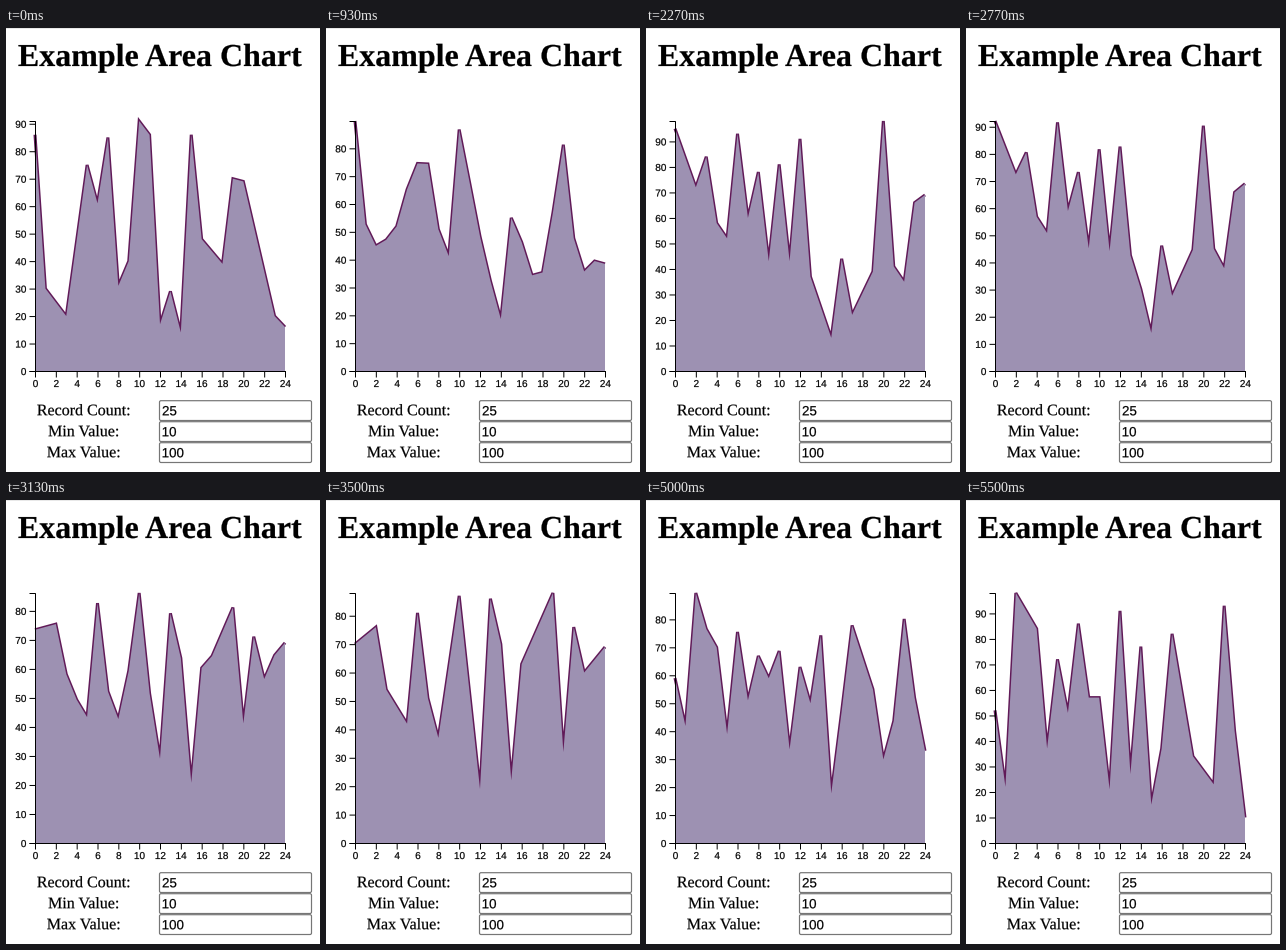
Write a matplotlib script that moves like this. It is 314x444 px and loops after 5570 ms.

```python
import numpy as np
import matplotlib.pyplot as plt
from matplotlib.animation import FuncAnimation
from matplotlib.patches import FancyBboxPatch, PathPatch, Polygon
from matplotlib.textpath import TextPath
from matplotlib.transforms import Affine2D

plt.rcParams.update({"path.simplify": False, "path.snap": False})

WIDTH, HEIGHT, DPI = 314, 444, 100
PX = 72 / DPI                       # points per pixel
LOOP_MS, STEP_MS, TICK_MS = 5570, 10, 100 / 3
FIRST_START, PERIOD, DURATION = 460, 2000, 1000

LEFT, BASE, SIZE = 29, 343, 250     # chart origin and side length
TICK = 6
FILL, STROKE = "#9d91b2", "#611a58"
SERIF, SANS = "Liberation Serif", "Liberation Sans"

_ = np.nan                          # on the straight run between its neighbours
KEY_POINTS = [
    [86, 30, _, 20, _, 75, 61, 85, 31, 40, 91, 86, 17, 29, 14, 86, 48, _, 39, 70, 69, _, _, 20, 16],
    [95, _, 72, 84, 58, 52, 93, 60, 78, 43, 81, 43, 91, 37, _, 13, 44, 22, _, 39, 98, 41, 35, 66, 69],
    [70, _, 76, 54, _, 42, 81, 51, 37, _, 87, _, 19, 86, 70, 22, 63, _, _, 88, 32, 76, 60, _, 69],
    [52, 22, 98, _, 84, 37, 72, 51, 86, 57, 57, 21, 91, 27, 77, 15, 37, 82, _, 34, _, 23, 93, 44, 10],
]


def fill_runs(points):
    points = np.array(points)
    index = np.arange(len(points))
    known = ~np.isnan(points)
    return np.interp(index, index[known], points[known])


SERIES = [fill_runs(points) for points in KEY_POINTS]
XS = LEFT + np.linspace(0, SIZE, len(SERIES[0]))


def ease_cubic(t):
    t = min(max(t, 0), 1)
    return 4 * t ** 3 if t < 0.5 else 1 - 4 * (1 - t) ** 3


def values_at(ms):
    values = SERIES[0]
    for i, target in enumerate(SERIES[1:]):
        progress = (ms - FIRST_START - i * PERIOD) / DURATION
        values = values + (target - values) * ease_cubic(progress)
    return values


fig = plt.figure(figsize=(WIDTH / DPI, HEIGHT / DPI), dpi=DPI, facecolor="white")
ax = fig.add_axes([0, 0, 1, 1])
ax.set(xlim=(0, WIDTH), ylim=(HEIGHT, 0))
ax.axis("off")


def label(x, y, text, size, family, align=0.5, weight="normal"):
    """Draw text on baseline y; align is the fraction of its width left of x."""
    path = TextPath((0, 0), text, size=size, prop={"family": family, "weight": weight})
    box = path.get_extents()
    place = Affine2D().scale(1, -1).translate(x - box.x0 - align * box.width, y)
    return ax.add_patch(PathPatch(path.transformed(place), fc="black", ec="black",
                                  lw=0.2 * PX, zorder=3))


def stroke(xs, ys, color="black", width=1, zorder=3):
    return ax.plot(xs, ys, color=color, lw=width * PX, zorder=zorder,
                   solid_capstyle="butt", solid_joinstyle="miter")[0]


def form_row(y, name, value):
    label(77.3, y + 15.2, name, 16, SERIF)
    ax.add_patch(FancyBboxPatch((153.5, y + 0.7), 152, 19.8, fc="white", ec="#767676",
                                lw=1.2 * PX, boxstyle="round,pad=0,rounding_size=1.5"))
    label(156.7, y + 15.3, value, 13.33, SANS, align=0)


stroke([0, WIDTH], [0.5, 0.5], "#e8e8e8")
label(154, 38, "Example Area Chart", 32, SERIF, weight="bold")
for row, (name, value) in enumerate([("Record Count:", "25"), ("Min Value:", "10"),
                                     ("Max Value:", "100")]):
    form_row(372 + 21 * row, name, value)

# The opaque area hides the inner half of the outline
line = stroke(XS, XS, STROKE, 3, zorder=1.5)
area = ax.add_patch(Polygon(np.zeros((3, 2)), fc=FILL, lw=0, zorder=2))

# Axes sit on pixel centres
axis_x, axis_y, top = LEFT + 0.5, BASE + 0.5, BASE + 0.5 - SIZE
stroke([axis_x, axis_x + SIZE + 0.5], [axis_y, axis_y])
stroke([axis_x - TICK, axis_x, axis_x, axis_x - TICK], [top, top, axis_y, axis_y])
for i in range(0, len(XS), 2):
    x = XS[i] + 0.5
    stroke([x, x], [axis_y, axis_y + TICK])
    label(x, 359, str(i), 10, SANS)

levels = range(0, 100, 10)
y_ticks = [stroke([axis_x - TICK, axis_x], [axis_y, axis_y]) for level in levels]
y_labels = [label(axis_x - 9.5, 3.5, str(level), 10, SANS, align=1) for level in levels]


def draw(frame):
    ms = int((frame * STEP_MS + 4) / TICK_MS) * TICK_MS
    values = values_at(ms)
    peak = values.max()
    ys = BASE - values * SIZE / peak
    line.set_ydata(ys)
    area.set_xy([(XS[0], BASE), *zip(XS, ys), (XS[-1], BASE)])
    for level, tick, text in zip(levels, y_ticks, y_labels):
        y = axis_y - level * SIZE / peak
        tick.set_ydata([y, y])
        text.set_transform(Affine2D().translate(0, y) + ax.transData)
        tick.set_visible(level <= peak)
        text.set_visible(level <= peak)
    return [line, area, *y_ticks, *y_labels]


anim = FuncAnimation(fig, draw, frames=LOOP_MS // STEP_MS, interval=STEP_MS,
                     repeat=True, repeat_delay=0, cache_frame_data=False)
plt.show()
```
